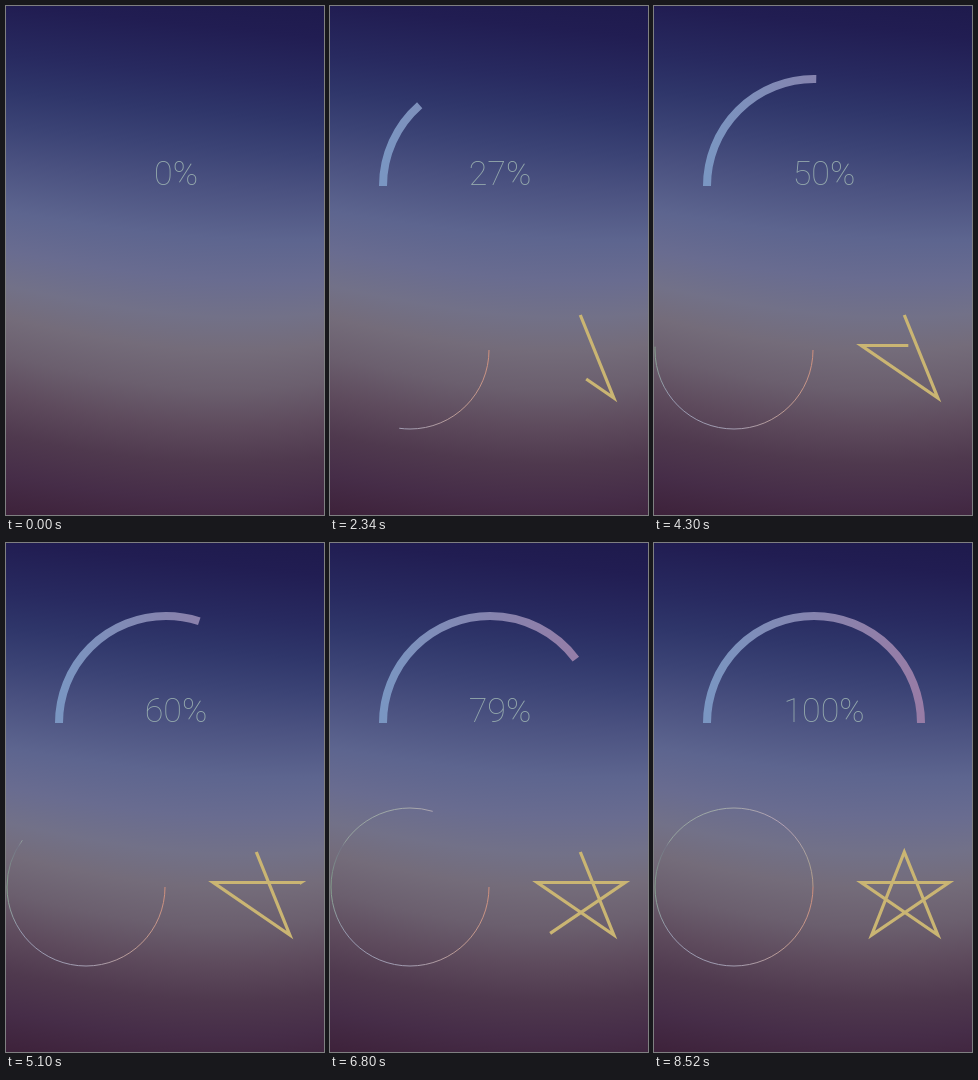
Write an HTML page with a canvas that moves like this. It is 318 by 509 pixels and loops after 8.58 s.

```html
<!DOCTYPE html>
<html>
<head>
<meta charset="utf-8">
<title>Progress shapes</title>
<style>
html, body { margin: 0; width: 100%; height: 100%; overflow: hidden; background: #3a4274; }
canvas { display: block; }
</style>
</head>
<body>
<canvas id="stage" width="318" height="509"></canvas>
<script>
const W = 318, H = 509, LOOP = 8580, STEPS = 128;
const stage = document.getElementById('stage');
const ctx = stage.getContext('2d');

// [time in ms, step]: progress runs at a slightly uneven pace
const PACE = [
  [0, 0], [60, 1], [900, 13], [960, 14], [1240, 18], [1760, 26], [1820, 27],
  [2640, 40], [2700, 41], [3540, 53], [3600, 54], [4420, 67], [4480, 68],
  [5100, 77], [5320, 80], [5380, 81], [6180, 93], [6240, 94], [7040, 106],
  [7100, 107], [7460, 113], [7900, 119], [8000, 120], [8520, 128], [LOOP, 128]
];

function progressAt(t) {
  const i = PACE.findIndex(([time]) => time > t);
  const [t0, s0] = PACE[i - 1], [t1, s1] = PACE[i];
  const step = Math.floor(s0 + (s1 - s0) * (t - t0) / (t1 - t0) + 0.01);
  return Math.max(0, (step - 0.3) / (STEPS - 0.3));
}

// Dusk sky: colours down the left edge, shifted along a curve in each column
const SKY = [
  [-45, '#1d194a'], [0, '#211d52'], [50, '#282a60'], [85, '#2f366a'],
  [120, '#3b4375'], [155, '#4a5180'], [205, '#5d658f'], [245, '#696c90'],
  [280, '#727188'], [312, '#746c7a'], [350, '#6b5f6e'], [390, '#5e4b5d'],
  [430, '#4f394e'], [470, '#462d48'], [515, '#3c2038']
];

function paintSky() {
  const sky = document.createElement('canvas');
  sky.width = W;
  sky.height = H;
  const c = sky.getContext('2d');
  const top = -60, bottom = 600;
  for (let x = 0; x < W; x++) {
    const slope = 32 * x / W, bowl = 34 * Math.sin(Math.PI * x / 440);
    const g = c.createLinearGradient(0, top, 0, bottom);
    for (const [y, color] of SKY) {
      const k = Math.min(1, Math.max(0, (y - 100) / 240));
      const fade = y > 350 ? 1 - (y - 350) / 400 : 1;
      const shift = (slope * (1 - k) + bowl * k) * fade;
      g.addColorStop((y + shift - top) / (bottom - top), color);
    }
    c.fillStyle = g;
    c.fillRect(x, 0, 1, H);
  }
  return sky;
}

function withStops(gradient, colors) {
  for (const [at, color] of colors) gradient.addColorStop(at, color);
  return gradient;
}

const sky = paintSky();
const arcInk = withStops(ctx.createLinearGradient(53, 0, 267, 0),
  [[0, '#7a96c2'], [0.5, '#8583ae'], [1, '#987ca6']]);
const ringInk = withStops(ctx.createConicGradient(0, 80, 344), [
  [0, '#d08f7c'], [0.14, '#bd9a92'], [0.25, '#a29cb0'], [0.4, '#9698ae'],
  [0.5, '#84a08c'], [0.585, '#747486'], [0.6, '#93a09c'], [0.72, '#a0a8a8'],
  [0.86, '#b4a0b4'], [0.95, '#a8a096'], [1, '#b89a88']
]);

const STAR = [[250.3, 309], [283.8, 392], [207.3, 339.5], [295, 339.5], [217.7, 392]];
const starLength = STAR.reduce((sum, [x, y], i) => {
  const [nx, ny] = STAR[(i + 1) % STAR.length];
  return sum + Math.hypot(nx - x, ny - y);
}, 0);

function strokeArc(x, y, r, from, sweep, ink, width) {
  ctx.beginPath();
  ctx.arc(x, y, r, from, from + sweep);
  ctx.strokeStyle = ink;
  ctx.lineWidth = width;
  ctx.stroke();
}

function strokeStar(p) {
  ctx.beginPath();
  for (const [x, y] of STAR) ctx.lineTo(x, y);
  ctx.closePath();
  ctx.strokeStyle = '#cab573';
  ctx.lineWidth = 3.2;
  ctx.setLineDash(p < 1 ? [p * starLength, starLength * 2] : []);
  ctx.stroke();
  ctx.setLineDash([]);
}

function draw(t) {
  const p = progressAt(t);
  ctx.drawImage(sky, 0, 0);
  if (p > 0) {
    strokeArc(160, 180, 107, Math.PI, p * Math.PI, arcInk, 8);
    strokeArc(80, 344, 79, 0, p * 2 * Math.PI, ringInk, 1);
    strokeStar(p);
  }
  ctx.font = '100 34px Roboto, Lato, sans-serif';
  ctx.textAlign = 'center';
  ctx.fillStyle = '#94a9ac';
  ctx.fillText(Math.floor(p * 100 + 1e-6) + '%', 170, 179);
}

const start = performance.now();
function tick() {
  draw((performance.now() - start) % LOOP);
  requestAnimationFrame(tick);
}
ctx.miterLimit = 10;
tick();
</script>
</body>
</html>
```
